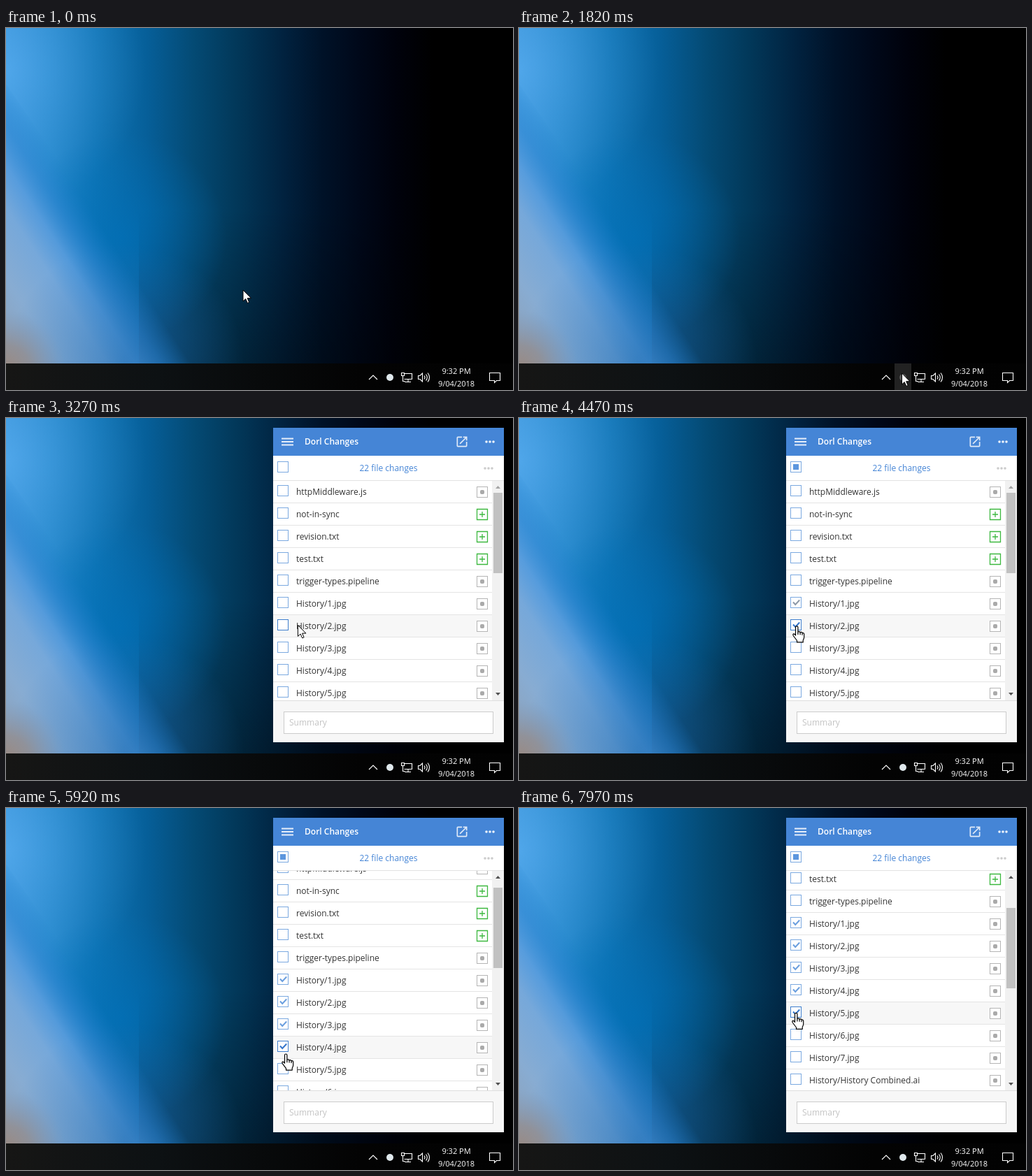
An HTML page for the animation above (8000 ms loop, 725 by 518 pixels).

```html
<!DOCTYPE html>
<html lang="en">
<head>
<meta charset="utf-8">
<title>File changes</title>
<style>
html, body { margin: 0; width: 100%; height: 100%; overflow: hidden; background: #000; }
svg { display: block; }
text { font: 12px "Open Sans", "Noto Sans", sans-serif; white-space: pre; }
.clock text { font-size: 11px; fill: #fff; text-anchor: middle; }
.box { fill: #fff; stroke: #7ba9e0; }
.tick { fill: none; stroke: #6b9fdf; stroke-width: 2; }
.hot .box { stroke: #3f7fce; }
.hot .tick { stroke: #3576cb; }
.hot .back { fill: #f7f7f7; }
.back { fill: #fff; }
</style>
</head>
<body>
<svg id="stage" width="725" height="518" viewBox="0 0 725 518">
  <defs>
    <linearGradient id="sky" gradientUnits="userSpaceOnUse" x1="0" y1="0" x2="610" y2="0">
      <stop offset="0" stop-color="#3c98de"/>
      <stop offset=".1" stop-color="#268ace"/>
      <stop offset=".21" stop-color="#0f75b6"/>
      <stop offset=".33" stop-color="#065f99"/>
      <stop offset=".44" stop-color="#044a74"/>
      <stop offset=".53" stop-color="#023a5c"/>
      <stop offset=".65" stop-color="#01223f"/>
      <stop offset=".74" stop-color="#001228"/>
      <stop offset=".83" stop-color="#000819"/>
      <stop offset=".91" stop-color="#00020c"/>
      <stop offset="1" stop-color="#000"/>
    </linearGradient>
    <linearGradient id="dusk" x1="0" y1="0" x2="0" y2="1">
      <stop offset="0" stop-color="#000" stop-opacity="0"/>
      <stop offset="1" stop-color="#000" stop-opacity=".35"/>
    </linearGradient>
    <radialGradient id="haze" gradientUnits="userSpaceOnUse" cx="0" cy="60" r="200">
      <stop offset="0" stop-color="#5db0f2" stop-opacity=".6"/>
      <stop offset="1" stop-color="#4a98d8" stop-opacity="0"/>
    </radialGradient>
    <radialGradient id="deep" gradientUnits="userSpaceOnUse" cx="165" cy="300" r="150">
      <stop offset="0" stop-color="#0070b8" stop-opacity=".7"/>
      <stop offset="1" stop-color="#0070b8" stop-opacity="0"/>
    </radialGradient>
    <linearGradient id="limb" gradientUnits="userSpaceOnUse" x1="144" y1="295" x2="-42" y2="416">
      <stop offset="0" stop-color="#1a7cc8" stop-opacity="0"/>
      <stop offset=".16" stop-color="#3288d2" stop-opacity=".6"/>
      <stop offset=".3" stop-color="#5a9ddd" stop-opacity=".9"/>
      <stop offset=".45" stop-color="#76a8da"/>
      <stop offset=".7" stop-color="#88acd2"/>
      <stop offset="1" stop-color="#8da0b6"/>
    </linearGradient>
    <radialGradient id="shade" gradientUnits="userSpaceOnUse" cx="170" cy="480" r="170">
      <stop offset="0" stop-color="#1766ac" stop-opacity=".55"/>
      <stop offset="1" stop-color="#2f74b8" stop-opacity="0"/>
    </radialGradient>
    <radialGradient id="sand" gradientUnits="userSpaceOnUse" cx="0" cy="488" r="85">
      <stop offset="0" stop-color="#9a8a82"/>
      <stop offset=".4" stop-color="#928f93" stop-opacity=".85"/>
      <stop offset="1" stop-color="#8098b8" stop-opacity="0"/>
    </radialGradient>
    <linearGradient id="bar">
      <stop offset="0" stop-color="#161615"/>
      <stop offset=".3" stop-color="#0d1113"/>
      <stop offset=".7" stop-color="#030303"/>
      <stop offset="1" stop-color="#020202"/>
    </linearGradient>
    <clipPath id="listClip"><rect x="382" y="90" width="330" height="314"/></clipPath>
  </defs>

  <rect width="725" height="518"/>
  <rect width="725" height="480" fill="url(#sky)"/>
  <rect width="725" height="480" fill="url(#haze)"/>
  <rect y="260" x="190" width="535" height="220" fill="url(#dusk)"/>
  <rect width="725" height="480" fill="url(#deep)"/>
  <path d="M0 80L275 480H0Z" fill="url(#limb)"/>
  <rect width="400" height="480" fill="url(#shade)"/>
  <rect width="120" height="480" fill="url(#sand)"/>

  <rect y="480" width="725" height="38" fill="url(#bar)"/>
  <rect id="glow" x="537" y="480" width="24" height="38" fill="#222"/>
  <circle id="trayIcon" cx="549" cy="500" r="5"/>
  <g fill="none" stroke="#fff" stroke-width="1.1">
    <path d="M519 503l6-6 6 6"/>
    <path d="M569.5 494.5h11v8h-11M575 503v4M570 506.5h9M565.5 493.5h4v4h-4zM567.5 497.5v8h3"/>
    <path d="M589.5 497.5h2.5l3.5-3.5v12l-3.5-3.5h-2.500zM598 497.500q2 2.500 0 5M600.500 495.500q3.500 4.500 0 9M603 493.500q5 6.500 0 13"/>
    <path d="M691.500 493.500h15v11h-5l-3 3v-3h-7z"/>
  </g>
  <g class="clock">
    <text x="644" y="495">9:32 PM</text>
    <text x="644" y="513">9/04/2018</text>
  </g>

  <g id="panel">
    <rect x="382" y="14" width="330" height="450" fill="#fff"/>
    <rect x="382" y="14" width="330" height="40" fill="#4585d6"/>
    <path d="M394 29.500h17M394 34h17M394 38.500h17" stroke="#e6eefa" stroke-width="1.800"/>
    <text x="427" y="38" fill="#fff" style="font-weight:600">Dorl Changes</text>
    <path transform="translate(642 24) scale(.833)" fill="#e0eaf8" d="M19 19H5V5h7V3H5a2 2 0 0 0-2 2v14a2 2 0 0 0 2 2h14a2 2 0 0 0 2-2v-7h-2zM14 3v2h3.600l-9.800 9.800 1.400 1.400L19 6.400V10h2V3z"/>
    <g fill="#eef4fc"><circle cx="687" cy="34" r="1.800"/><circle cx="692" cy="34" r="1.800"/><circle cx="697" cy="34" r="1.800"/></g>
    <rect class="box" x="388.500" y="62.500" width="15" height="15"/>
    <rect id="some" x="392" y="66" width="8" height="8" fill="#5c96de"/>
    <text x="547" y="76" fill="#4585d6" text-anchor="middle">22 file changes</text>
    <g fill="#ccc"><circle cx="685" cy="72" r="1.800"/><circle cx="690" cy="72" r="1.800"/><circle cx="695" cy="72" r="1.800"/></g>
    <path d="M382 89.500h330" stroke="#e2e2e2"/>
    <g clip-path="url(#listClip)">
      <g id="rows"></g>
      <rect x="695" y="90" width="17" height="314" fill="#f1f1f1"/>
      <path id="upArrow" d="M700 101h7l-3.500-4z"/>
      <path d="M700 393h7l-3.500 4z" fill="#505050"/>
      <rect id="thumb" x="697" y="107" width="13" height="115" fill="#c1c1c1"/>
    </g>
    <rect x="382" y="404" width="330" height="60" fill="#f7f7f7"/>
    <path d="M382 404.500h330" stroke="#dedede"/>
    <rect x="397.500" y="420.500" width="299" height="31" fill="#fff" stroke="#ccc"/>
    <text x="405" y="440" fill="#c3c3c3">Summary</text>
  </g>

  <g id="cursor" stroke="#000" stroke-linejoin="round">
    <path id="arrow" fill="#fff" d="M0 0V16L3.700 12.600 6.300 18.500 8.700 17.500 6.200 11.700H11.500Z"/>
    <g id="hand" transform="translate(-6 0)" fill="#fff" stroke-width="1.200">
      <path d="M4.500 13.500V2a1.700 1.700 0 0 1 3.400 0V8.500q2-1 3.200 .6 2-.8 3 .9 2.200-.5 2.600 1.600V16q0 2-1.500 4.500V23.400H6.500V21L1.600 14.500Q0 12 1.600 11.400 3 11.200 4.500 13.500Z"/>
      <path fill="none" d="M7.900 8.500v4M11.100 9.200v3.500M14.100 10.200v3"/>
    </g>
  </g>
</svg>
<script>
const LOOP = 8000, ROW = 32, TOP = 90;
const $ = id => document.getElementById(id);
const files = ["httpMiddleware.js", "not-in-sync", "revision.txt", "test.txt", "trigger-types.pipeline"];
for (let i = 1; i <= 7; i++) files.push(`History/${i}.jpg`);
files.push("History/History Combined.ai");

// row index -> time it gets ticked
const ticked = { 5: 3660, 6: 4470, 7: 4970, 8: 5500, 9: 7790 };

// time, x, y of the pointer's hot spot
const path = [
  [690, 339, 375], [1490, 541, 481], [1820, 547.5, 494],
  [2660, 547.5, 494], [3460, 396, 264],
  [3760, 396, 264], [4040, 397, 297.5],
  [4510, 397, 297.5], [4660, 398, 327],
  [5040, 398, 327], [5340, 400, 354], [5740, 400, 352],
  [6050, 400, 351.5], [6370, 408, 271], [6690, 395, 257],
  [6740, 395, 257], [6880, 394, 283],
  [7130, 394, 283], [7430, 396, 315], [7790, 396, 293]
];

const badge = (i, y) => i > 0 && i < 4
  ? `<path d="M673.5 ${y + 8.5}h15v15h-15zM677 ${y + 16}h8M681 ${y + 12}v8" fill="#fff" stroke="#3cb83f" stroke-width="1.3"/>`
  : `<rect x="673.5" y="${y + 8.5}" width="15" height="15" fill="#fff" stroke="#b5b5b5"/>
     <rect x="678" y="${y + 13}" width="6" height="6" rx="2" fill="#aaa"/>`;

$("rows").innerHTML = files.map((name, i) => {
  const y = TOP + ROW * i;
  return `<g><rect class="back" x="382" y="${y}" width="313" height="31"/>
    <path d="M382 ${y + 31.5}h313" stroke="#e4e4e4"/>
    <rect class="box" x="388.5" y="${y + 6.5}" width="15" height="15"/>
    <path class="tick" d="M392 ${y + 13.5}l3.200 3.500 6-6.500"/>
    <text x="415" y="${y + 20}" fill="#333">${name}</text>${badge(i, y)}</g>`;
}).join("");
const rows = [...$("rows").children];
const ticks = rows.map(r => r.querySelector(".tick"));

const clamp = v => Math.min(1, Math.max(0, v));
const ease = (t, a, b) => { const p = clamp((t - a) / (b - a)); return p * p * (3 - 2 * p); };
const show = (el, on) => el.setAttribute("visibility", on ? "inherit" : "hidden");

function pointerAt(t) {
  let [, x, y] = path[0];
  for (let i = 1; i < path.length; i++) {
    const [a, x0, y0] = path[i - 1], [b, x1, y1] = path[i];
    if (t < a) break;
    const p = ease(t, a, b);
    x = x0 + (x1 - x0) * p;
    y = y0 + (y1 - y0) * p;
  }
  return [x, y];
}

function draw(t) {
  const open = t >= 2070;
  const scroll = t < 5920 ? 0 : Math.round(100 * ease(t, 5852, 6102));
  const [x, y] = pointerAt(t);
  const listY = y - TOP + scroll;

  show($("panel"), open);
  show($("some"), t >= 3660);
  $("rows").setAttribute("transform", `translate(0 ${-scroll})`);
  $("thumb").setAttribute("y", 107 + Math.round(scroll * 0.36));
  $("upArrow").setAttribute("fill", scroll ? "#505050" : "#a3a3a3");

  // hover and pointer shape lag while the list is scrolling
  const lag = t >= 5740 && t < 6120;
  const inList = open && x > 382 && x < 695 && y >= TOP && y < 404;
  const hot = lag ? 8 : inList ? Math.floor(listY / ROW) : -1;
  rows.forEach((row, i) => {
    row.setAttribute("class", i === hot ? "hot" : "");
    show(ticks[i], t >= ticked[i]);
  });
  ticks[5].style.stroke = t >= 4040 && t < 5920 ? "#8d99a8" : "";

  const inBox = (listY - 6 + ROW) % ROW < 16;
  const hand = lag || (inList && x >= 388 && x <= 404 && inBox);
  show($("hand"), hand);
  show($("arrow"), !hand);
  $("cursor").setAttribute("transform", `translate(${x.toFixed(1)} ${y.toFixed(1)})`);

  const over = t >= 1490 && t < 2690;
  $("glow").setAttribute("opacity", over ? (open ? 0.5 : ease(t, 1490, 1760)) : 0);
  $("trayIcon").setAttribute("fill", over ? "#555" : "#dfe8ec");
}

const start = performance.now();
function tick(now) {
  draw(Math.max(0, now - start) % LOOP);
  requestAnimationFrame(tick);
}
draw(0);
requestAnimationFrame(tick);
</script>
</body>
</html>
```
